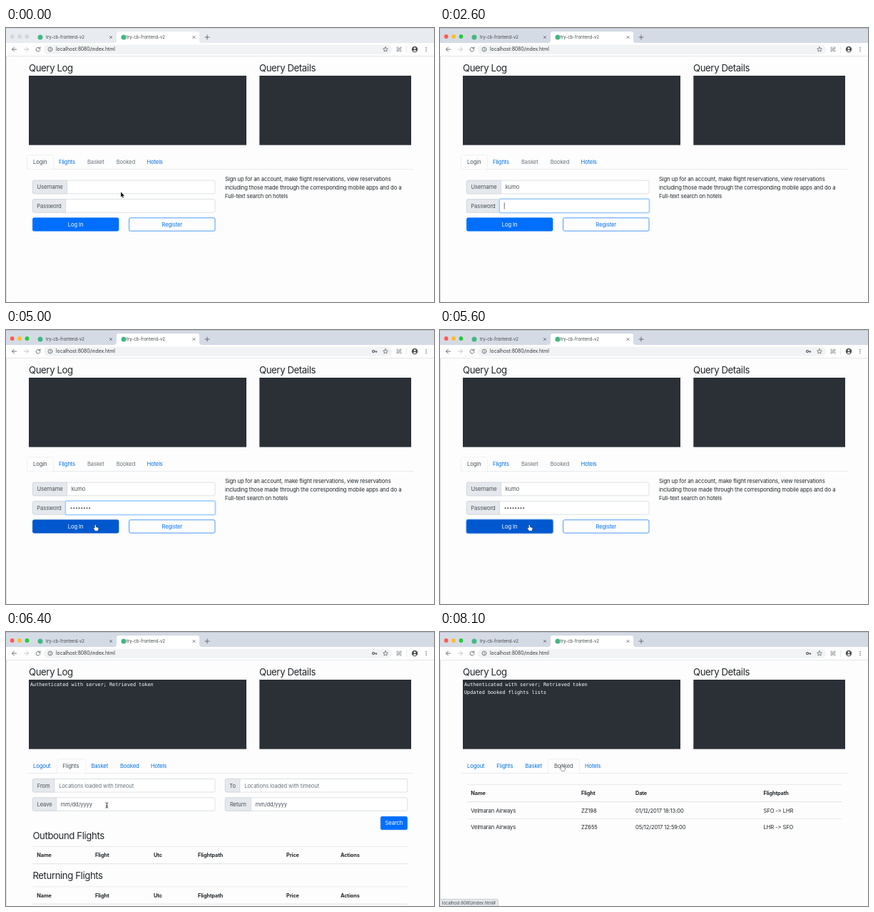
An HTML page with a canvas for the animation above (8300 ms loop, 600x385 px).

```html
<!DOCTYPE html>
<html lang="en">
<head>
<meta charset="utf-8">
<title>Flight booking</title>
<style>
html, body { margin: 0; width: 100%; height: 100%; overflow: hidden; background: #fdfdfd; }
canvas { display: block; width: 600px; height: 385px; }
</style>
</head>
<body>
<canvas id="stage"></canvas>
<script>
const LOOP = 8300, STEP = 100;
const SANS = 'Inter, "Open Sans", sans-serif';
const MONO = '"DejaVu Sans Mono", "Noto Sans Mono", monospace';
const PAGE = '#fdfdfd', INK = '#212529', FIELD = '#495057', MUTED = '#6c757d';
const LINE = '#dee2e6', EDGE = '#ced4da', BLUE = '#006ffd', LINK = '#006fe6';
const USER = 'kumo', AIRLINE = 'Velmaran Airways';

const canvas = document.getElementById('stage');
const ctx = canvas.getContext('2d');
const dpr = window.devicePixelRatio || 1;
canvas.width = 600 * dpr;
canvas.height = 385 * dpr;

const clamp = v => Math.max(0, Math.min(1, v));
const ease = v => v * v * (3 - 2 * v);
const fade = (t, start) => clamp((t - start) / 150);

// Text is placed by the vertical middle of its capitals.
function text(str, x, mid, o = {}) {
  const size = o.size || 7.6;
  ctx.font = `${o.weight || 400} ${size}px ${o.font || SANS}`;
  ctx.letterSpacing = (o.track ?? -0.1) + 'px';
  ctx.textAlign = o.align || 'left';
  ctx.fillStyle = o.color || INK;
  ctx.fillText(str, x, mid + size * 0.36);
}

function rect(x, y, w, h, color) {
  ctx.fillStyle = color;
  ctx.fillRect(x, y, w, h);
}

function box(x, y, w, h, r, fill, stroke, width = 0.7) {
  ctx.beginPath();
  ctx.roundRect(x, y, w, h, r);
  if (fill) { ctx.fillStyle = fill; ctx.fill(); }
  if (stroke) { ctx.strokeStyle = stroke; ctx.lineWidth = width; ctx.stroke(); }
}

function dot(x, y, r, color) {
  ctx.fillStyle = color;
  ctx.beginPath();
  ctx.arc(x, y, r, 0, 7);
  ctx.fill();
}

function path(d, x, y, stroke, width, fill) {
  ctx.save();
  ctx.translate(x, y);
  const p = new Path2D(d);
  ctx.lineJoin = ctx.lineCap = 'round';
  if (stroke) { ctx.strokeStyle = stroke; ctx.lineWidth = width; ctx.stroke(p); }
  if (fill) { ctx.fillStyle = fill; ctx.fill(p); }
  ctx.restore();
}

function browser(t) {
  const active = t >= 400;
  const icon = '#5f6368';
  rect(0, 0, 600, 21, active ? '#d5dbe5' : '#e8ebef');
  rect(0, 0, 600, 1, active ? '#bcc3cd' : '#d5d8dc');
  ['#fc5b57', '#fdbc2e', '#28c840'].forEach((c, i) =>
    dot(8.7 + 10.4 * i, 12, 2.9, active ? c : '#d3d6da'));

  path('M151 21 Q155 21 155 17 V8 Q155 5 158 5 H268 Q271 5 271 8 V17 Q271 21 275 21 Z', 0, 0, null, 0, '#fff');
  [48, 165].forEach((x, i) => {
    dot(x, 13, 3.5, '#41b883');
    text('try-cb-frontend-v2', i ? 169 : 56, 13, { size: 6.1, track: -0.05, color: '#45494d' });
  });
  for (const x of [147, 263.5]) path('M-1.7-1.7L1.7 1.7M1.7-1.7L-1.7 1.7', x, 13, icon, 0.8);
  path('M-3 0H3M0-3V3', 282, 13, icon, 0.9);

  rect(0, 21, 600, 18, '#fff');
  rect(0, 39, 600, 0.7, '#dcdee1');
  path('M3 0H-3M0-3L-3 0L0 3', 11.5, 30, icon, 0.9);
  path('M-3 0H3M0-3L3 0L0 3', 28.5, 30, '#bdc1c6', 0.9);
  path('M2.2-1.8A2.9 2.9 0 1 0 2.9 .6M2.9-3.2V-1H.7', 45, 30, icon, 0.9);
  box(53, 23.5, 488, 13.4, 6.7, '#f1f3f4');
  path('M3 0A3 3 0 1 1-3 0A3 3 0 1 1 3 0M0-.3V1.5M0-1.6V-1.5', 62, 30, icon, 0.8);
  text('localhost:8080/index.html', 70, 30, { size: 6.9, track: -0.08, color: '#35383c' });

  if (t >= 3100) {
    path('M0 0A1.5 1.5 0 1 1-3 0A1.5 1.5 0 1 1 0 0H3.4M2.5 0V1.4', 516.5, 30, '#4b4f54', 1.1);
  }
  path('M0-3.4L1-1.1L3.4-.9L1.6 .7L2.1 3L0 1.8L-2.1 3L-1.6 .7L-3.4-.9L-1-1.1Z', 532, 30, icon, 0.75);
  path('M-3-1V-3H-1M1-3H3V-1M3 1V3H1M-1 3H-3V1M-2 2L2-2M-1.6-1.2H1.6V1.4H-1.6Z', 551, 30, '#9a9ea3', 0.9);
  rect(561.5, 25, 0.6, 10, '#d8dadd');
  dot(573, 30, 4.2, '#4a4e53');
  dot(573, 28.7, 1.4, '#fff');
  path('M-2.4 2.4Q0-.3 2.4 2.4Q0 4 -2.4 2.4Z', 573, 30, null, 0, '#fff');
  for (const y of [27.4, 30, 32.6]) dot(589, y, 0.75, icon);
}

function logs(t) {
  const head = { size: 13.2, track: -0.4 };
  text('Query Log', 32, 56, head);
  text('Query Details', 355, 56, head);
  rect(32, 67, 305, 97.5, '#2b3037');
  rect(355.3, 67, 212.7, 97.5, '#2b3037');
  const mono = { size: 6.84, track: 0, font: MONO, color: '#fff' };
  if (t >= 5900) text('Authenticated with server; Retrieved token', 34, 74, mono);
  if (t >= 7400) text('Updated booked flights lists', 34, 84.4, mono);
}

function tabShape(x, w, stroke, fill) {
  path(`M${x} 198.4V181Q${x} 178.5 ${x + 2.5} 178.5H${x + w - 2.5}Q${x + w} 178.5 ${x + w} 181V198.4`,
    0, 0, stroke, 0.7, fill);
}

function tabs(t) {
  const guest = t < 5900;
  const xs = guest ? [38, 74, 114, 154.7, 197.5] : [38, 79.3, 119.5, 160, 203];
  const names = [guest ? 'Login' : 'Logout', 'Flights', 'Basket', 'Booked', 'Hotels'];
  const current = guest ? 0 : t < 7300 ? 1 : 3;
  const [left, width] = [[30, 36], [71.3, 40.5], null, [152, 43]][current];
  rect(30, 198, 541, 0.7, LINE);
  if (t >= 6900 && t < 7300) tabShape(152, 43, '#e9ecef', null);
  tabShape(left, width, '#d8dce1', PAGE);
  names.forEach((name, i) => {
    const off = guest && (i === 2 || i === 3);
    text(name, xs[i], 188.5, { color: i === current ? FIELD : off ? MUTED : LINK });
  });
  if (t >= 6900 && t < 7300) rect(160, 192.3, 26.5, 0.6, LINK);
}

// An input with a grey label in front; focus runs from 0 to 1.
function field(x, y, split, right, label, value, color, focus = 0) {
  const h = 18.6;
  box(x, y, right - x, h, 2, '#fff', EDGE);
  box(x, y, split - x, h, [2, 0, 0, 2], '#e5e8ec', EDGE);
  text(label, (x + split) / 2, y + h / 2 + 0.1, { color: FIELD, align: 'center' });
  if (focus > 0) {
    ctx.save();
    ctx.globalAlpha *= focus;
    box(split - 0.6, y - 0.6, right - split + 1.2, h + 1.2, 2, null, '#bfdeff', 2);
    box(split, y, right - split, h, 1.5, '#fff', '#80bdff');
    ctx.restore();
  }
  if (value) text(value, split + 6.2, y + h / 2 + 0.1, { color });
}

const caret = (x, mid) => rect(x, mid - 4.6, 0.7, 9.2, '#333');

const userKeys = [1900, 2000, 2200, 2300];
const passKeys = [3000, 3300, 3500, 3700, 3900, 4100, 4200, 4400];
const typed = (keys, t) => keys.filter(k => t >= k).length;

function login(t, hover) {
  const userFocus = t < 2500 ? fade(t, 1350) : 1 - fade(t, 2450);
  const passFocus = t < 5500 ? fade(t, 2450) : 1 - fade(t, 5450);
  const name = USER.slice(0, typed(userKeys, t));
  const count = typed(passKeys, t);

  field(37.4, 214.2, 85.6, 293, 'Username', name, FIELD, userFocus);
  field(37.4, 240.6, 83.6, 293, 'Password', '', FIELD, passFocus);
  for (let i = 0; i < count; i++) dot(91.6 + 3.65 * i, 250.2, 1.05, FIELD);
  if (t >= 1400 && t < 2500) {
    ctx.font = `400 7.6px ${SANS}`;
    ctx.letterSpacing = '-0.1px';
    caret(91.8 + ctx.measureText(name).width, 223.5);
  }
  if (t >= 2500 && t < 5500 && (t < 4900 || t >= 5400)) caret(89.8 + 3.65 * count, 249.9);

  if (t >= 5500) {
    ctx.save();
    ctx.globalAlpha = fade(t, 5450);
    box(36.8, 266.2, 121.8, 19.6, 2.5, null, '#a9d0ff', 1.7);
    ctx.restore();
  }
  box(37.4, 266.8, 120.6, 18.4, 2, hover ? '#0058cf' : BLUE, hover ? '#0052c2' : BLUE);
  text('Log In', 97.6, 276.1, { color: '#fff', align: 'center' });
  box(172.6, 266.8, 120.4, 18.4, 2, null, BLUE);
  text('Register', 232.8, 276.1, { color: BLUE, align: 'center' });

  ['Sign up for an account, make flight reservations, view reservations',
    'including those made through the corresponding mobile apps and do a',
    'Full-text search on hotels'
  ].forEach((line, i) => text(line, 307, 212.5 + 11.8 * i));
}

function headRow(y, left, cols) {
  rect(left, y, 563 - left, 0.7, LINE);
  for (const [name, x] of cols) text(name, x, y + 12.4, { weight: 700, size: 7.3 });
  rect(left, y + 24.1, 563 - left, 1, LINE);
}

function flights() {
  const hint = 'Locations loaded with timeout', date = 'mm/dd/yyyy';
  field(37.4, 206.4, 68, 293, 'From', hint, MUTED);
  field(307.3, 206.4, 328, 562.7, 'To', hint, MUTED);
  field(37.4, 232.8, 70.6, 293, 'Leave', date, FIELD);
  field(307.3, 232.8, 343.6, 562.7, 'Return', date, FIELD);
  box(525.3, 259.3, 37.2, 18.4, 2, BLUE, BLUE);
  text('Search', 543.9, 268.6, { color: '#fff', align: 'center' });

  const cols = [['Name', 43.3], ['Flight', 125], ['Utc', 207], ['Flightpath', 269], ['Price', 393], ['Actions', 469]];
  [['Outbound Flights', 286], ['Returning Flights', 342.5]].forEach(([title, y]) => {
    text(title, 37.4, y, { size: 13.2, track: -0.4 });
    headRow(y + 15.1, 37.4, cols);
  });
}

function booked() {
  const xs = [43.3, 198, 274, 453.5];
  headRow(214, 38, ['Name', 'Flight', 'Date', 'Flightpath'].map((n, i) => [n, xs[i]]));
  const rows = [
    [AIRLINE, 'ZZ198', '01/12/2017 18:13:00', 'SFO -> LHR'],
    [AIRLINE, 'ZZ655', '05/12/2017 12:59:00', 'LHR -> SFO']
  ];
  rows.forEach((row, r) => row.forEach((cell, i) => text(cell, xs[i], 250.8 + 23.9 * r)));
  rect(38, 262.3, 525, 0.7, LINE);
}

function status() {
  box(-2, 375.4, 83.5, 12, [0, 2.5, 0, 0], '#e3e6ea', '#bfc3c8');
  text('localhost:8080/index.html#', 3, 380.6, { size: 6, track: -0.1, color: '#4d5155' });
}

// Pointer stops: time, x, y.
const stops = [
  [0, 161, 230.6], [100, 161, 230.6], [200, 160.5, 230], [800, 160.5, 230], [1200, 142.5, 228],
  [4500, 142.5, 228], [5000, 125.3, 274.2], [6000, 125.3, 274.2], [7000, 171, 187]
];

function pointer(t) {
  const i = stops.findIndex(s => s[0] > t);
  if (i < 0) return stops[stops.length - 1].slice(1);
  const [a, b] = [stops[i - 1], stops[i]];
  const k = ease((t - a[0]) / (b[0] - a[0]));
  return [a[1] + (b[1] - a[1]) * k, a[2] + (b[2] - a[2]) * k];
}

function pointerKind(t, x, y) {
  const inside = (l, top, r, bottom) => x > l && x < r && y > top && y < bottom;
  if (t < 900) return 'arrow';
  if (t < 5900) {
    if (inside(37, 266, 158, 286)) return 'hand';
    return inside(85, 214, 293, 233) || inside(84, 240, 293, 260) ? 'beam' : 'arrow';
  }
  if (inside(152, 178, 195, 198)) return 'hand';
  return inside(68, 206, 293, 225) || inside(70, 232, 293, 252) ? 'beam' : 'arrow';
}

function drawPointer(kind, x, y) {
  if (kind === 'beam') {
    const d = 'M-1.6-3.6Q0-3.6 0-2.4Q0-3.6 1.6-3.6M0-2.4V2.4M-1.6 3.6Q0 3.6 0 2.4Q0 3.6 1.6 3.6M-.9 .9H.9';
    path(d, x, y, '#fff', 1.6);
    path(d, x, y, '#222', 0.8);
  } else if (kind === 'hand') {
    path('M-.7 .2Q0-.9 .7 .2V3L1.4 2.7L2.1 3.2L2.9 3.1L3.5 3.7L4.2 3.8V5.6L3.4 8H-.2L-2.3 5L-2.5 3.9L-1.7 3.9L-.7 4.9Z',
      x, y, '#222', 0.9, '#fff');
  } else {
    const d = 'M0 0V7L1.6 5.5L2.8 8.1L3.9 7.6L2.8 5.1H5Z';
    path(d, x, y, '#fff', 1.3);
    path(d, x, y, null, 0, '#111');
  }
}

function draw(now) {
  const t = Math.floor((now % LOOP) / STEP) * STEP;
  const [x, y] = pointer(t);
  const kind = pointerKind(t, x, y);
  ctx.setTransform(dpr, 0, 0, dpr, 0, 0);
  ctx.globalAlpha = 1;
  rect(0, 0, 600, 385, PAGE);
  browser(t);
  logs(t);
  tabs(t);
  if (t < 5900) {
    login(t, kind === 'hand');
  } else {
    ctx.globalAlpha = t < 7300 ? fade(t, 5860) : fade(t, 7290);
    (t < 7300 ? flights : booked)();
    ctx.globalAlpha = 1;
  }
  rect(0, 40, 0.6, 345, '#c4c7cb');
  if (t >= 6900) status();
  if (t < 1900 || t >= 4600) drawPointer(kind, x, y);
}

const start = performance.now();
function tick() {
  draw(performance.now() - start);
  requestAnimationFrame(tick);
}
tick();
</script>
</body>
</html>
```
